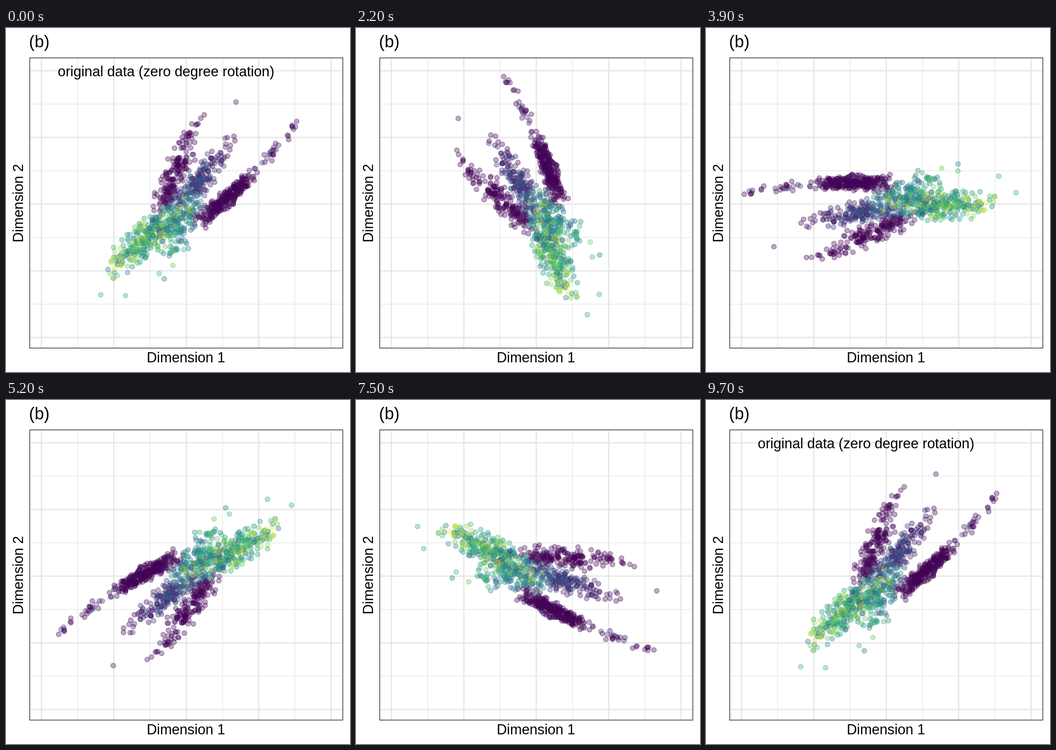
An HTML page for the animation above (10000 ms loop, 748x748 px).

```html
<!DOCTYPE html>
<html lang="en">
<head>
<meta charset="utf-8">
<title>Rotating scatter plot</title>
<style>
  html, body { margin: 0; width: 100%; height: 100%; overflow: hidden; background: #fff; }
  svg { display: block; width: 100%; height: 100%; }
  text { font: 30.7px "Liberation Sans", Arial, sans-serif; fill: #000; }
  .title { font-size: 36.5px; }
  .mid { text-anchor: middle; }
  circle { fill-opacity: .35; stroke-opacity: .4; stroke-width: 1.5px; }
</style>
</head>
<body>
<svg viewBox="0 0 748 748">
  <rect width="748" height="748" fill="#fff"/>
  <g id="grid" stroke="#e7e7e7"></g>
  <g id="dots"></g>
  <text id="label" class="mid" x="348" y="105"></text>
  <rect x="51.6" y="65" width="680.8" height="631" fill="none" stroke="#333" stroke-width="1.5"/>
  <text class="title" x="50" y="42">(b)</text>
  <text class="mid" x="391.2" y="727">Dimension 1</text>
  <text class="mid" transform="translate(37 381) rotate(-90)">Dimension 2</text>
</svg>
<script>
const NS = 'http://www.w3.org/2000/svg';
const LOOP = 10000, STEP = 100;
const CX = 392, CY = 383, UX = 157.5, UY = 145;
const grid = document.getElementById('grid');
const layer = document.getElementById('dots');
const label = document.getElementById('label');

function add(parent, tag, attrs) {
  const el = document.createElementNS(NS, tag);
  for (const key in attrs) el.setAttribute(key, attrs[key]);
  return parent.appendChild(el);
}

// Half-unit grid lines, minor ones first
for (const major of [false, true]) {
  for (let i = -4; i <= 4; i++) {
    if ((i % 2 === 0) !== major) continue;
    const x = CX + i * UX / 2, y = CY + i * UY / 2, w = major ? 2.9 : 1.5;
    add(grid, 'line', { x1: 52, x2: 732, y1: y, y2: y, 'stroke-width': w });
    add(grid, 'line', { x1: x, x2: x, y1: 65, y2: 696, 'stroke-width': w });
  }
}

let seed = 20;
function rand() {
  seed = (seed + 0x6d2b79f5) | 0;
  let t = Math.imul(seed ^ (seed >>> 15), 1 | seed);
  t = (t + Math.imul(t ^ (t >>> 7), 61 | t)) ^ t;
  return ((t ^ (t >>> 14)) >>> 0) / 4294967296;
}
const gauss = () => 2 * (rand() + rand() + rand()) - 3;

const STOPS = [[68, 1, 84], [65, 68, 135], [42, 120, 142], [34, 168, 132], [122, 209, 81], [253, 231, 37]];
function viridis(v) {
  const p = Math.max(0, Math.min(.9999, v)) * 5, i = Math.floor(p);
  return `rgb(${STOPS[i].map((c, k) => Math.round(c + (STOPS[i + 1][k] - c) * (p - i)))})`;
}

// Positions are screen pixels at zero rotation
const points = [];
const put = (x, y, v) => points.push({ x: (x - CX) / UX, y: (CY - y) / UY, v, key: rand() });

// Scatters n points of the given spread along a quadratic Bezier curve
function strand(n, [a, b, c], spread, along, value) {
  while (n > 0) {
    const t = along();
    if (t < 0 || t > 1) continue;
    const at = k => (1 - t) ** 2 * a[k] + 2 * t * (1 - t) * b[k] + t * t * c[k];
    put(at(0) + spread * gauss(), at(1) + spread * gauss(), value(t));
    n--;
  }
}
const around = (mean, sd) => () => mean + sd * gauss();
const dark = () => .03 * rand();
const teal = t => .58 - .12 * t + .11 * gauss();
const yellow = () => .74 + .26 * rand();

const right = [[412, 425], [510, 360], [632, 203]];
const left = [[330, 412], [370, 320], [420, 185]];
const middle = [[350, 410], [425, 340], [492, 235]];
const body = [[205, 555], [300, 450], [415, 380]];
const fringe = [[325, 550], [365, 460], [410, 395]];

strand(300, right, 7.5, around(.33, .12), dark);
strand(30, right, 6, () => .55 + .45 * rand() ** 1.5, () => .2 * rand() ** 2);
strand(185, left, 11, around(.46, .22), dark);
strand(200, middle, 11, around(.5, .21), t => .38 * (1 - t) + .1 * gauss());
strand(260, body, 16, around(.58, .2), teal);
strand(70, fringe, 13, around(.62, .22), teal);
strand(105, body, 13, around(.5, .19), yellow);

// The outermost points
put(632, 203, 0);
put(500, 161, .03);
put(206, 580, .63);
put(260, 582, .63);

points.sort((a, b) => a.key - b.key);
for (const p of points) {
  const color = viridis(p.v);
  p.el = add(layer, 'circle', { r: 5.3, fill: color, stroke: color });
}

// Key poses: time in ms, rotation in degrees
const TURN = [
  [0, 0], [800, 0], [1900, 51.3], [4100, 145], [4500, 145], [5200, 167.2],
  [6700, 236.8], [7800, 305.2], [8200, 315.4], [8500, 315.4], [9500, 360], [LOOP, 360]
];
function angleAt(t) {
  const i = TURN.findIndex(k => k[0] > t);
  const [t0, a0] = TURN[i - 1], [t1, a1] = TURN[i];
  return a0 + (a1 - a0) * (t - t0) / (t1 - t0);
}

function labelAt(t) {
  if (t < 900 || t >= 9500) return 'original data (zero degree rotation)';
  if (t >= 4100 && t < 4600) return 'transformed data (145 degree rotation)';
  if (t >= 8200 && t < 8600) return 'transformed data (315 degree rotation)';
  return '';
}

let shown = -1;
function render(ms) {
  const t = Math.floor((ms % LOOP) / STEP) * STEP;
  if (t === shown) return;
  shown = t;
  const a = angleAt(t) * Math.PI / 180, c = Math.cos(a), s = Math.sin(a);
  for (const p of points) {
    p.el.setAttribute('cx', (CX + UX * (p.x * c - p.y * s)).toFixed(2));
    p.el.setAttribute('cy', (CY - UY * (p.x * s + p.y * c)).toFixed(2));
  }
  label.textContent = labelAt(t);
}

const start = performance.now();
function tick() {
  render(performance.now() - start);
  requestAnimationFrame(tick);
}
tick();
</script>
</body>
</html>
```
